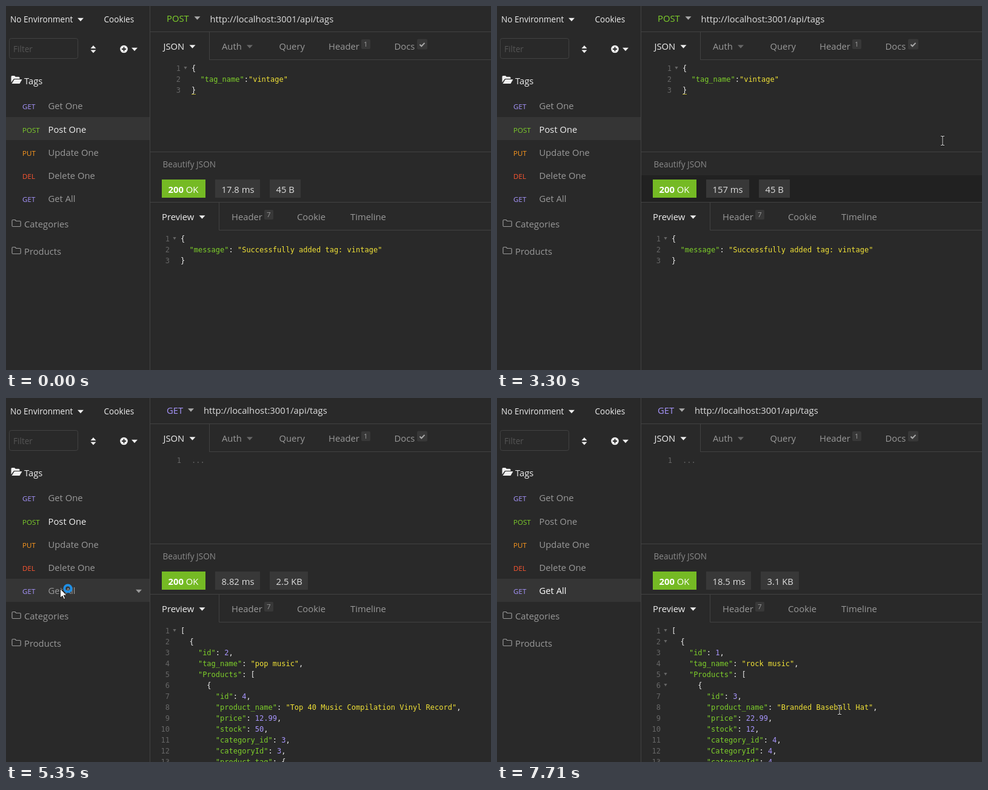
Animation of 800x600 px, one loop 8 s. Source, as an HTML page:

```html
<!DOCTYPE html>
<html lang="en">
<head>
<meta charset="utf-8">
<title>API client</title>
<style>
html, body { margin: 0; width: 100%; height: 100%; overflow: hidden; background: #292929; }
svg { display: block; width: 800px; height: 600px; }
text { font: 14.8px "Open Sans", "Noto Sans", sans-serif; fill: #999; white-space: pre; }
.s { font-size: 13.6px; }
.m { font-size: 11.6px; }
.code { font: 12px "DejaVu Sans Mono", monospace; fill: #eee; }
.num { fill: #666; text-anchor: end; }
.w { fill: #eee; }
.dim { fill: #666; }
.green { fill: #7ecf2b; }
.yellow { fill: #f0e137; }
.violet { fill: #a896ff; }
.orange { fill: #ff9a1f; }
.red { fill: #ff5631; }
.line { fill: none; stroke: #424242; }
.box { fill: #383838; }
.row { fill: #353535; }

/* States that switch at fixed moments of the loop */
.post, .get, .r1, .r2, .r3, .r4, .tint, .busy, .late3, .late4 { animation: 8s step-end infinite; }
.post { animation-name: post; }
.get { animation-name: get; }
.r1 { animation-name: r1; }
.r2 { animation-name: r2; }
.r3 { animation-name: r3; }
.r4 { animation-name: r4; }
.tint { animation-name: tint; }
.busy { animation-name: busy; }
.late3 { animation-name: late3; }
.late4 { animation-name: late4; }
@keyframes post { 0% { opacity: 1 } 66.875%, 100% { opacity: 0 } }
@keyframes get { 0% { opacity: 0 } 66.875%, 100% { opacity: 1 } }
@keyframes r1 { 0% { opacity: 1 } 34.25%, 100% { opacity: 0 } }
@keyframes r2 { 0% { opacity: 0 } 34.25% { opacity: 1 } 66.875%, 100% { opacity: 0 } }
@keyframes r3 { 0% { opacity: 0 } 66.875% { opacity: 1 } 88.125%, 100% { opacity: 0 } }
@keyframes r4 { 0% { opacity: 0 } 88.125%, 100% { opacity: 1 } }
@keyframes tint {
  0% { opacity: 0; width: 448px } 17.625% { opacity: 1; width: 448px }
  30.5% { opacity: 1; width: 562px } 66.875%, 100% { opacity: 0; width: 562px }
}
@keyframes busy {
  0% { opacity: 0 } 30.5% { opacity: 1 } 34.25% { opacity: 0 }
  86.625% { opacity: 1 } 88.125%, 100% { opacity: 0 }
}
@keyframes late3 { 0% { opacity: 0 } 72.25%, 100% { opacity: 1 } }
@keyframes late4 { 0% { opacity: 0 } 92%, 100% { opacity: 1 } }

.fadeOut { animation: fadeOut 8s linear infinite; }
.fadeIn { animation: fadeIn 8s linear infinite; }
@keyframes fadeOut { 0%, 67.6% { fill: #eee } 69.125%, 100% { fill: #999 } }
@keyframes fadeIn { 0%, 67.6% { fill: #999 } 69.125%, 100% { fill: #fff } }
.spin { animation: spin 2s linear -1.07s infinite; }
@keyframes spin { to { transform: rotate(360deg) } }
</style>
</head>
<body>
<svg viewBox="0 0 800 600">
  <defs>
    <path id="caret" d="M-5 -2.7H5L0 2.8Z"/>
    <path id="fold" d="M-2.6 -2H2.6L0 2.6Z" fill="#666"/>
    <path id="folder" d="M.5 2.5q0-1.5 1.5-1.5h3.5l1.7 2h6q1.5 0 1.5 1.5v6q0 1.5-1.5 1.5h-11.2q-1.5 0-1.5-1.5z" fill="none" stroke="#999" stroke-width="1.2"/>
    <g id="turn">
      <path d="M-24 -5A24.5 24.5 0 0 1 18 -16.6" fill="none" stroke="#ddd" stroke-width="8"/>
      <path d="M28 -25V-5H8Z" fill="#ddd" stroke="#ddd" stroke-width="2" stroke-linejoin="round"/>
    </g>
    <path id="bar" d="M-3 -7.5h2q1 0 1 1q0-1 1-1h2M0 -7V7M-3 7.5h2q1 0 1-1q0 1 1 1h2"/>
  </defs>
  <rect width="800" height="600" fill="#292929"/>

  <!-- Sidebar -->
  <rect class="row post" y="183" width="237" height="38"/>
  <rect class="row get" y="298" width="237" height="38"/>
  <text class="w s" x="7" y="27">No Environment</text>
  <use href="#caret" x="123" y="22.5" class="w"/>
  <text class="w s" x="161.5" y="27">Cookies</text>
  <rect class="line" x="5.5" y="53.5" width="113" height="33" rx="3"/>
  <text class="s" x="12" y="76" style="fill:#555">Filter</text>
  <path class="w" d="M139.5 70L144 65L148.5 70ZM139.5 72.5H148.5L144 77.5Z"/>
  <circle class="w" cx="194.5" cy="71" r="6.3"/>
  <path d="M191 71h7M194.5 67.5v7" stroke="#292929" stroke-width="2"/>
  <use href="#caret" x="212" y="71.5" class="w"/>
  <path class="w" d="M8.5 126V116.5q0-1.5 1.5-1.5h4l1.8 1.8h5.2q1.5 0 1.5 1.5V120H13Z"/>
  <path class="w" d="M13.8 121H26.5L22.5 128H9.5Z"/>
  <text class="w" x="30" y="129">Tags</text>
  <g id="rows"></g>
  <use href="#folder" x="9.5" y="351.5"/>
  <text x="30" y="365">Categories</text>
  <use href="#folder" x="9.5" y="396.5"/>
  <text x="30" y="410">Products</text>

  <!-- Request -->
  <g class="post">
    <text class="green" x="265" y="26">POST</text>
    <use href="#caret" x="315.5" y="20" fill="#aaa"/>
    <text x="336.5" y="27" style="fill:#ddd">http://localhost:3001/api/tags</text>
    <g id="body"></g>
    <path d="M306 145.5h7" stroke="#f0e137" opacity=".7"/>
  </g>
  <g class="get">
    <text class="violet" x="265" y="26">GET</text>
    <use href="#caret" x="305" y="20" fill="#aaa"/>
    <text x="326" y="26" style="fill:#ddd">http://localhost:3001/api/tags</text>
    <text class="code num" x="289" y="107">1</text>
    <text class="code dim" x="306" y="107">...</text>
  </g>
  <text class="w" x="259.5" y="72">JSON</text>
  <use href="#caret" x="307.5" y="67" class="w"/>
  <text x="356" y="72">Auth</text>
  <use href="#caret" x="402" y="67" class="dim"/>
  <text x="450.5" y="72">Query</text>
  <text x="532" y="72">Header</text>
  <rect class="box" x="586" y="55" width="15" height="16" rx="2"/>
  <text class="m" x="590" y="67">1</text>
  <text x="640.5" y="72">Docs</text>
  <rect class="box" x="678" y="54.5" width="17" height="17" rx="2"/>
  <path d="M682.5 63.5l2.8 2.8 5.2-5.4" fill="none" stroke="#aaa" stroke-width="2"/>
  <text class="s" x="258.5" y="266" style="fill:#8a8a8a">Beautify JSON</text>

  <!-- Response -->
  <rect class="tint" x="238" y="279" height="44" fill="#212121"/>
  <rect x="257" y="286" width="72" height="30" fill="#75ba24"/>
  <text x="267.5" y="308" style="fill:#fff"><tspan font-weight="700">200</tspan> OK</text>
  <g id="stats"></g>
  <text class="w" x="257" y="353">Preview</text>
  <use href="#caret" x="323.5" y="348" class="w"/>
  <text x="372" y="353">Header</text>
  <rect class="box" x="426" y="336" width="15" height="16" rx="2"/>
  <text class="m" x="430" y="348">7</text>
  <text x="480" y="353">Cookie</text>
  <text x="568" y="353">Timeline</text>
  <g id="replies"></g>
  <path class="line" d="M237.5 0V600M238 42.5H800M335.5 43V88.5H800M238 240.5H800M238 323.5H800M351.5 324V369.5H800"/>

  <g class="busy">
    <rect x="238" y="279" width="562" height="321" fill="#1e1e1e" opacity=".73"/>
    <text x="543.5" y="521" style="font-size:23.5px;fill:#eee">Loading...</text>
    <g transform="translate(596 588)"><g class="spin">
      <use href="#turn"/>
      <use href="#turn" transform="rotate(180)"/>
    </g></g>
  </g>

  <!-- Pointer -->
  <use id="hover" href="#caret" x="219" fill="#999"/>
  <g id="beam" fill="none">
    <use href="#bar" stroke="#111" stroke-width="2.4"/>
    <use href="#bar" stroke="#ddd"/>
  </g>
  <g id="arrow">
    <path d="M.5 .5V15.5L4 12.2L6.5 17.5L8.8 16.5L6.3 11.2H11Z" fill="#fff" stroke="#111" stroke-width=".9"/>
    <circle cx="13" r="5.6" fill="none" stroke="#1f8fe5" stroke-width="4"/>
  </g>
</svg>
<script>
const $ = id => document.getElementById(id);

const rows = [
  ["GET", "violet", "Get One", "", 170],
  ["POST", "green", "Post One", "fadeOut", 209],
  ["PUT", "orange", "Update One", "", 247],
  ["DEL", "red", "Delete One", "", 285],
  ["GET", "violet", "Get All", "fadeIn", 323]
];
$("rows").innerHTML = rows.map(([verb, color, name, state, y]) =>
  `<text class="m ${color}" x="27" y="${y}">${verb}</text>` +
  `<text class="${state}" x="69.5" y="${y}">${name}</text>`).join("");

// Colour keys, strings and numbers of one JSON line
const paint = line => line.replace(/("[^"]*")(:?)|[\d.]+/g, (all, str, colon) =>
  !str ? `<tspan class="violet">${all}</tspan>` :
  `<tspan class="${colon ? "green" : "yellow"}">${str}</tspan>${colon}`);

function listing(src, x, y, late = "") {
  return src.map((line, i) => {
    const base = y + 18 * i;
    const fold = /[{[]$/.test(line)
      ? `<g class="${i ? late : ""}"><use href="#fold" x="${x - 10}" y="${base - 5}"/></g>` : "";
    return `<text class="code num" x="${x - 18}" y="${base}">${i + 1}</text>${fold}` +
      `<text class="code" x="${x}" y="${base}">${paint(line)}</text>`;
  }).join("");
}

const added = ["{", '  "message": "Successfully added tag: vintage"', "}"];
const tagList = (id, tag, product, name, price, stock, cat, tail) => [
  "[", "  {", `    "id": ${id},`, `    "tag_name": "${tag}",`, '    "Products": [', "      {",
  ...[`"id": ${product},`, `"product_name": "${name}",`, `"price": ${price},`,
    `"stock": ${stock},`, `"category_id": ${cat},`, ...tail].map(s => " ".repeat(8) + s)
];
const pop = tagList(2, "pop music", 4, "Top 40 Music Compilation Vinyl Record", 12.99, 50, 3,
  ['"categoryId": 3,', '"product_tag": {']);
const rock = tagList(1, "rock music", 3, "Branded Baseball Hat", 22.99, 12, 4,
  ['"CategoryId": 4,', '"categoryId": 4,']);

$("body").innerHTML = listing(["{", '  "tag_name":"vintage"', "}"], 306, 107);
$("replies").innerHTML = [added, added, pop, rock].map((src, i) =>
  `<g class="r${i + 1}">${listing(src, 288, 388, "late" + (i + 1))}</g>`).join("");

const chip = (x, w, label) =>
  `<rect class="box" x="${x}" y="286" width="${w}" height="30"/>` +
  `<text x="${x + 10.5}" y="308" style="fill:#ddd">${label}</text>`;
const stats = [
  ["17.8 ms", 74, "45 B", 51], ["157 ms", 71, "45 B", 51],
  ["8.82 ms", 74, "2.5 KB", 63], ["18.5 ms", 74, "3.1 KB", 63]
];
$("stats").innerHTML = stats.map(([time, w, size, w2], i) =>
  `<g class="r${i + 1}">${chip(345, w, time)}${chip(361 + w, w2, size)}</g>`).join("");

// Pointer trips: end time, then [time, x, y] points
const trips = [
  [1640, [810, 9, 356], [930, 90, 350], [1050, 250, 330], [1170, 360, 305], [1290, 520, 300],
    [1410, 665, 285], [1470, 640, 262], [1530, 582, 235], [1590, 638, 191]],
  [1940, [1640, 655, 178], [1760, 715, 125], [1880, 763, 84]],
  [4120, [3300, 735, 222], [3480, 600, 268], [3660, 420, 296], [3840, 250, 292], [4080, 126, 260]],
  [4940, [4120, 125, 245], [4300, 116, 187], [4420, 85, 171], [4600, 30, 190], [4720, 45, 225], [4900, 110, 247]],
  [5780, [4940, 108, 262], [5060, 98, 297], [5180, 89, 314]],
  [6240, [5780, 96, 309], [5900, 170, 262], [6020, 300, 198], [6140, 560, 130], [6200, 760, 78]],
  [8000, [7350, 710, 198], [7470, 650, 300], [7590, 598, 420], [7710, 565, 514]]
];
const LOOP = 8000, STEP = 60;

function pointer(t) {
  const trip = trips.find(([end, first]) => t >= first[0] && t < end);
  if (!trip) return null;
  const pts = trip.slice(1), start = pts[0][0];
  const q = start + Math.floor((t - start) / STEP) * STEP;
  const n = pts.findIndex(p => p[0] > q);
  if (n < 0) return pts[pts.length - 1].slice(1);
  const a = pts[n - 1], b = pts[n], k = (q - a[0]) / (b[0] - a[0]);
  return [a[1] + (b[1] - a[1]) * k, a[2] + (b[2] - a[2]) * k];
}

const show = (el, on) => el.setAttribute("visibility", on ? "visible" : "hidden");

let origin;
function draw(now) {
  origin ??= now;
  const at = pointer((now - origin) % LOOP);
  const [x, y] = at || [0, 0];
  const typing = x > 238 && (y > 88 && y < 240 || y > 370);
  for (const id of ["beam", "arrow"]) {
    $(id).setAttribute("transform", `translate(${x} ${y})`);
    show($(id), at && typing === (id === "beam"));
  }
  const row = Math.floor((y - 145) / 38.25);
  show($("hover"), at && x < 238 && row >= 0 && row < 5);
  $("hover").setAttribute("y", 165.5 + row * 38.25);
  requestAnimationFrame(draw);
}
requestAnimationFrame(draw);
</script>
</body>
</html>
```
